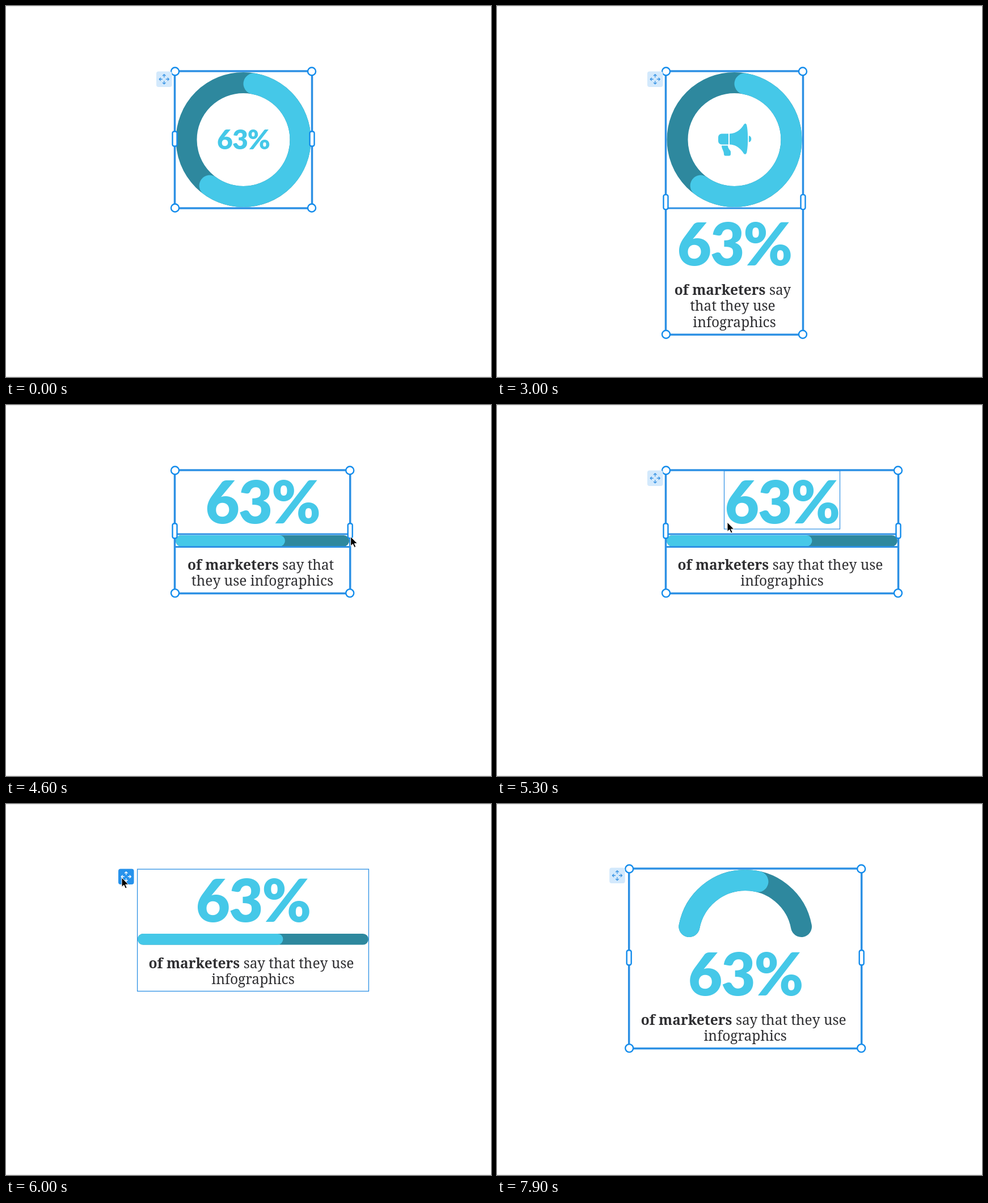
Animation, 855 px wide and 655 px high, one loop 8000 ms. Source, as an HTML page:

```html
<!DOCTYPE html>
<html lang="en">
<head>
<meta charset="utf-8">
<style>
  html, body { margin: 0; width: 100%; height: 100%; overflow: hidden; background: #fff; }
  svg { display: block; }
  text { text-anchor: middle; }
  .num { font: 900 104px Lato, sans-serif; letter-spacing: -.02em; fill: #45c8e8; }
  .num.small { font-size: 48px; }
  .copy { font: 24.5px "Noto Serif", serif; fill: #2f2f32; }
  .copy tspan { font-weight: 700; }
  .line { fill: none; stroke: #2c90e4; }
  .knob { fill: #fff; stroke: #138cec; stroke-width: 2.4; }
</style>
</head>
<body>
<svg id="stage" width="855" height="655" viewBox="0 0 855 655"></svg>
<script>
const LOOP = 8000, STEP = 100;
const LIGHT = '#45c8e8', DARK = '#2e889e';
const R = 100.5, RING = 37, CAP = 10.6, SHARE = 0.63;
const stage = document.getElementById('stage');

// Layout shown from each time on
const scenes = [
  { at: 0, chart: 'ring', inside: true },
  { at: 400, chart: 'ring', inside: true, icon: true },
  { at: 1300, chart: 'ring', inside: true, icon: true, copy: true },
  { at: 1900, chart: 'ring', icon: true, copy: true },
  { at: 3100, chart: 'arch', copy: true },
  { at: 3900, chart: 'bar', copy: true },
  { at: 7500, chart: 'arch', copy: true }
];

// Keyframes: time, then values
const frameKeys = [
  [4400, 298, 115.5, 241], [4900, 298, 115.5, 409], [5500, 298, 115.5, 409],
  [5600, 275, 114.5, 409], [5700, 240, 114.5, 409], [5800, 216, 114.5, 409],
  [5900, 223, 114.5, 409], [6000, 231, 114.5, 409], [6100, 231, 114.5, 409],
  [6200, 233.2, 114.5, 409]
];
const cursorKeys = [
  [4000, 583, 275], [4300, 540, 238], [4400, 540, 238], [4900, 709, 224],
  [5000, 709, 224], [5300, 406, 207], [5500, 271, 131], [5600, 248, 130],
  [5700, 213, 130], [5800, 189, 130], [5900, 196, 130], [6000, 204, 130]
];

function tween(keys, t) {
  const next = keys.findIndex(k => k[0] > t);
  if (next === 0) return keys[0].slice(1);
  if (next < 0) return keys[keys.length - 1].slice(1);
  const a = keys[next - 1], b = keys[next];
  const p = (t - a[0]) / (b[0] - a[0]);
  return a.slice(1).map((v, i) => v + (b[i + 1] - v) * p);
}

const within = (t, a, b) => t >= a && t < b;
const at = (x, y, body, scale = 1) =>
  `<g transform="translate(${x} ${y}) scale(${scale})">${body}</g>`;
const box = (x, y, w, h, r, attrs) =>
  `<rect x="${x}" y="${y}" width="${w}" height="${h}" rx="${r}" ${attrs}/>`;
const outline = (x, y, w, h, width) =>
  box(x, y, w, h, 0, `class="line" stroke-width="${width}"`);

// Angles in degrees, clockwise from the top
function arc(from, to, color) {
  const point = a => {
    const r = a * Math.PI / 180;
    return `${R * Math.sin(r)} ${-R * Math.cos(r)}`;
  };
  return `<path d="M${point(from)}A${R} ${R} 0 ${to - from > 180 ? 1 : 0} 1 ${point(to)}"
    fill="none" stroke="${color}" stroke-width="${RING}" stroke-linecap="round"/>`;
}

const ring = (x, y) => at(x, y,
  `<circle r="${R}" fill="none" stroke="${DARK}" stroke-width="${RING}"/>` +
  arc(CAP, 360 * SHARE - CAP, LIGHT));

const arch = (x, y, scale) => at(x, y,
  arc(CAP - 90, 90 - CAP, DARK) + arc(CAP - 90, 180 * SHARE - 90 - CAP, LIGHT), scale);

const bar = (x, y, w) =>
  box(x, y, w, 19.5, 9.75, `fill="${DARK}"`) +
  box(x, y, w * SHARE, 19.5, 9.75, `fill="${LIGHT}"`);

const horn = (x, y) => at(x, y, `<path fill="${LIGHT}" d="
  M18 18H6a6 6 0 0 0-6 6v7a6 6 0 0 0 6 6h12z
  M20 18C32 18 41 9 45 2Q48-2 50 2C53 14 53 40 50 52Q48 56 45 53C41 46 32 37 20 37z
  M54 21.5a6 6 0 0 1 0 11.5z
  M6 39H17C17 45 22 47 22 50V54Q22 57 19 57H13Q10 57 10 54C10 48 6 45 6 39z"/>`);

const number = (x, base, cls = '') => `<text class="num ${cls}" x="${x}" y="${base}">63%</text>`;

function wrap(w) {
  if (w < 285) return [' say', 'that they use', 'infographics'];
  if (w < 340) return [' say that', 'they use infographics'];
  if (w < 385) return [' say that they', 'use infographics'];
  return [' say that they use', 'infographics'];
}

// Wrapped rows keep half of their trailing space
const copy = (x, y, rows) => rows.map((row, i) => {
  const left = i < rows.length - 1 ? 3 : 0;
  return `<text class="copy" x="${x - left}" y="${y + 39.5 + i * 28.6}">` +
    `${i ? '' : '<tspan>of marketers</tspan>'}${row}</text>`;
}).join('');

function mover(x, y, active) {
  const ink = active ? '#fff' : '#3994e4';
  const arrow = [0, 90, 180, 270].map(a =>
    `<path transform="rotate(${a})" d="M0-3.5V-8.6M-2.4-6.2L0-8.6 2.4-6.2"/>`).join('');
  return box(x, y, 27.5, 27.5, 4, `fill="${active ? '#2692ec' : '#d3e9fc'}"`) +
    at(x + 13.75, y + 13.75,
      `<g fill="none" stroke="${ink}" stroke-width="1.3" stroke-linecap="round" stroke-linejoin="round">${arrow}</g>`);
}

function selection(x, y, w, h) {
  const mid = y + h / 2 - 1.5;
  const sides = [x - 0.5, x + w + 0.5].map(kx => box(kx - 4, mid - 13, 8, 26, 3, 'class="knob"'));
  const corners = [x, x + w].flatMap(kx => [y, y + h].map(ky =>
    `<circle class="knob" cx="${kx}" cy="${ky}" r="7"/>`));
  return outline(x - 0.5, y - 0.5, w + 1, h + 1, 3.5) + sides.join('') + corners.join('');
}

const cursor = (x, y) => at(x, y,
  '<path d="M0 0V16.5L3.8 13 6.5 19 9.2 18 6.6 12.2H11.8Z" fill="#000" stroke="#fff" stroke-width="1"/>');

function draw(t) {
  const scene = scenes.filter(s => s.at <= t).pop();
  const [x, y, w] = tween(frameKeys, t);
  const cx = x + w / 2;
  const dragging = within(t, 5500, 6200), dropped = t >= 6200;
  let out = '', rules = [], bottom = y;

  const addNumber = () => {
    out += number(cx, bottom + 93.5);
    bottom += 105.5;
  };

  if (scene.chart === 'bar') {
    addNumber();
    rules = [bottom + 7, bottom + 29.5];
    out += bar(x + 1, bottom + 9, w - 2);
    bottom += 30;
  } else {
    if (scene.chart === 'ring') {
      out += ring(cx, y + 120.5);
      if (scene.icon) out += horn(cx - 28.5, y + (scene.inside ? 63.5 : 92));
      if (scene.inside) out += number(cx, y + (scene.icon ? 171.5 : 137.5), 'small');
      bottom += 241;
    } else {
      const scale = w < 300 ? 0.86 : 1;
      out += arch(cx, y + 120.5 * scale, scale);
      bottom += 122 * scale;
    }
    if (scene.copy) rules = [bottom + 0.5];
    if (scene.copy && !scene.inside) {
      bottom += 8;
      addNumber();
    }
  }

  if (scene.copy) {
    const rows = wrap(w);
    out += copy(cx, bottom, rows);
    bottom += 52.5 + 28.6 * (rows.length - 1);
  }

  const h = bottom - y;
  if (dragging) {
    out += outline(x + 0.6, y + 0.6, w - 1.2, h - 1.2, 1.3);
  } else {
    if (!dropped) out += rules.map(r => `<path class="line" d="M${x} ${r}h${w}" stroke-width="3"/>`).join('');
    out += selection(x, y, w, h);
  }
  if (within(t, 5300, 5400)) out += outline(cx - 102, y + 0.5, 204, 103, 1.2);

  if (!within(t, 4500, 5000)) {
    out += mover(x - (dropped ? 35 : 33), y - (dropped ? 2 : 0), within(t, 5500, 6400));
  }
  if (within(t, 4000, 6600)) out += cursor(...tween(cursorKeys, t));

  stage.innerHTML = '<path d="M0 .5H855M0 654.5H855" stroke="#e6e6e6"/>' + out;
}

let shown = -1;
const start = performance.now();
function tick() {
  const t = Math.floor((performance.now() - start) % LOOP / STEP) * STEP;
  if (t !== shown) draw(shown = t);
  requestAnimationFrame(tick);
}
tick();
</script>
</body>
</html>
```
